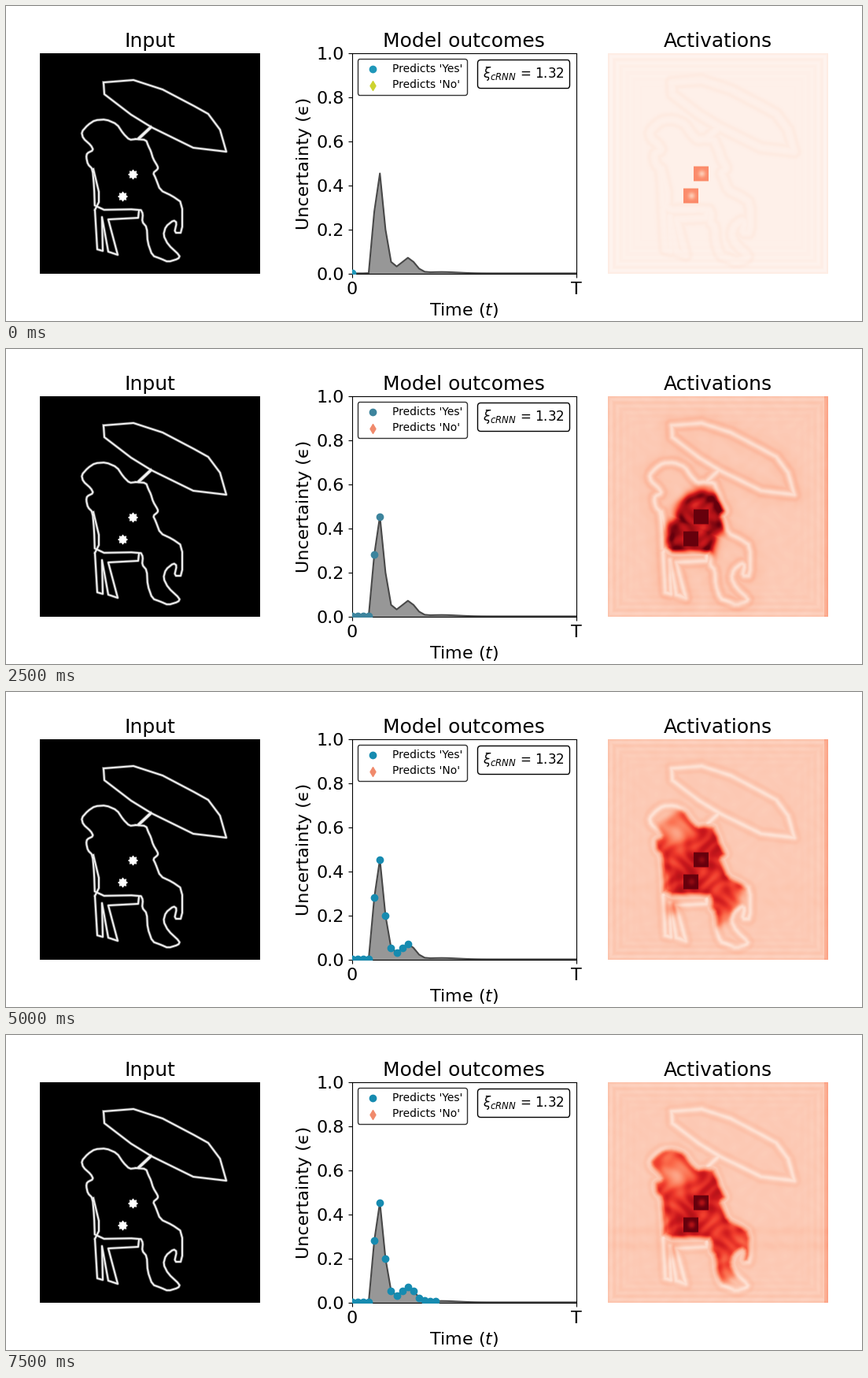
These frames come from a looping animation (1088 by 400 pixels, 8 s). A matplotlib script:

```python
import numpy as np
import matplotlib.pyplot as plt
from matplotlib.animation import FuncAnimation
from matplotlib.offsetbox import AnchoredText
from matplotlib.path import Path

plt.rcParams["font.family"] = "DejaVu Sans"
W, H, DPI, STEPS = 1088, 400, 100, 16
fig = plt.figure(figsize=(W / DPI, H / DPI), dpi=DPI, facecolor="white")


def panel(x, y, w, h, title):
    ax = fig.add_axes([x / W, 1 - (y + h) / H, w / W, h / H])
    ax.set_title(title, fontsize=18)
    return ax


def soften(line):
    """Cut every corner of an open line once."""
    a, b = line[:-1], line[1:]
    cut = np.stack([0.8 * a + 0.2 * b, 0.2 * a + 0.8 * b], axis=1)
    return np.vstack([line[:1], cut.reshape(-1, 2), line[-1:]])


# ---- line drawing, in stage pixels of the left panel
canopy = np.array([(124, 97), (162, 94), (199, 106), (239, 127), (257, 137),
                   (272, 157), (280, 185), (238, 180), (185, 154),
                   (159, 138), (125, 112), (124, 97)])
body = soften(np.array([
    (165, 169), (157, 170), (149, 162), (141, 150), (127, 144), (113, 145),
    (104, 151), (96, 160), (98, 168), (108, 177), (111, 183), (103, 187),
    (102, 192), (104, 201), (110, 207), (112, 230), (113, 259), (171, 258),
    (174, 264), (173, 274), (179, 281), (180, 300), (186, 317), (197, 321),
    (206, 325), (219, 321), (221, 317), (206, 303), (200, 291), (203, 280),
    (213, 272), (217, 275), (214, 288), (224, 288), (224, 250), (211, 241),
    (196, 234), (190, 218), (187, 212), (193, 207), (193, 204), (187, 194),
    (184, 184), (181, 178), (178, 170), (165, 169)]))
chair = np.array([(113, 259), (116, 309), (123, 311), (122, 268), (130, 312),
                  (142, 316), (130, 271), (168, 269), (169, 260)])
arm = np.array([(111, 207), (118, 236), (118, 249), (113, 259)])
handle = np.array([(184, 154), (169, 168)])
strokes = [canopy, body, chair, arm, handle]
dots = np.array([(161.5, 214), (148.5, 242)])

ax_in = panel(43, 60, 280, 280, "Input")
ax_in.set(xlim=(43, 323), ylim=(340, 60), xticks=[], yticks=[])
ax_in.set_facecolor("black")
ax_in.spines[:].set_visible(False)
for color, width in (("#5a5a5a", 2.6), ("#f2f2f2", 1.4)):
    for line in strokes:
        ax_in.plot(*line.T, color=color, lw=width + (line is handle),
                   solid_joinstyle="round")
ang = np.arange(16) * np.pi / 8
rad = np.where(np.arange(16) % 2, 4.6, 6.6)
for x, y in dots:
    ax_in.fill(x + rad * np.cos(ang), y + rad * np.sin(ang), color="white", lw=0)

# ---- uncertainty curve: a sharp peak, a small echo and a flat tail
steps = np.arange(41)
curve = 0.002 + 0.07 * np.exp(-((steps - 10) / 1.75) ** 2)
curve += 0.006 * np.exp(-((steps - 16) / 4) ** 2)
curve[3:9] += [.001, .28, .453, .198, .048, .012]

ax = panel(439.6, 60, 285, 280, "Model outcomes")
ax.set(xlim=(0, steps[-1]), ylim=(0, 1))
ax.fill_between(steps, curve, color="#979797", lw=0)
ax.plot(steps, curve, color="#484848", lw=1.5)
ax.set_xticks([0, steps[-1]], ["0", "T"])
ax.set_yticks(np.arange(0, 1.1, 0.2))
ax.tick_params(labelsize=16)
ax.set_xlabel("Time ($t$)", fontsize=16)
ax.set_ylabel("Uncertainty (\u03f5)", fontsize=16)
yes = ax.scatter([], [], marker="o", lw=1, zorder=3, label="Predicts 'Yes'")
no = ax.scatter([], [], marker="d", lw=1, label="Predicts 'No'")
legend = ax.legend(loc="upper left", fontsize=10, edgecolor="black")
yes_key, no_key = legend.legend_handles
note = AnchoredText(r"$\xi_{cRNN}$ = 1.32", loc="upper right",
                    prop=dict(size=12), pad=0.4, borderpad=0.5)
note.patch.set_boxstyle("round,pad=0,rounding_size=0.2")
ax.add_artist(note)

# ---- activation map: heat floods the figure from the two dots
gx, gy = np.meshgrid(43.5 + np.arange(280), 60.5 + np.arange(280))


def seg_dist(a, b):
    d = b - a
    t = ((gx - a[0]) * d[0] + (gy - a[1]) * d[1]) / (d @ d)
    t = np.clip(t, 0, 1)
    return np.hypot(gx - a[0] - t * d[0], gy - a[1] - t * d[1])


def line_dist(line):
    line = line.astype(float)
    return np.min([seg_dist(a, b) for a, b in zip(line, line[1:])], axis=0)


def bump(d, w):
    return np.exp(-(d / w) ** 2)


def spot(x, y):
    return np.hypot(gx - x, gy - y)


outline = np.min([line_dist(s) for s in strokes], axis=0)
points = np.column_stack([gx.ravel(), gy.ravel()])
inside = Path(body).contains_points(points).reshape(gx.shape)
mask = np.clip(0.4 + np.where(inside, 1, -1) * line_dist(body) / 8, 0, 1)
reach = np.min([spot(x, y - 2) for x, y in dots], axis=0)
edge = np.minimum.reduce([gx - 43, 323 - gx, gy - 60, 340 - gy])
ripple = np.cos(edge * 0.75) * np.exp(-edge / 14)
grain = (np.sin(gx * .21 + 1.5 * np.sin(gy * .13)) *
         np.sin(gy * .19 + 1.3 * np.sin(gx * .11)))
face = bump(spot(129, 178), 17)
seat = bump(spot(125, 275), 9)
band = bump(gy - 249, 6) + bump(gy - 268, 6)


def activation(k):
    settle = 1 - np.exp(-k)
    pulse = (k / 2) ** 2 * np.exp(2 - k)
    img = 0.2 - 0.17 * np.exp(-k / 1.1) + 0.03 * ripple
    img += 0.1 * settle * (gx > 318) + 0.006 * settle * grain
    img += (0.03 + 0.05 * pulse) * bump(outline - 6.5, 3)
    img += 0.05 * pulse * bump(outline - 10, 10)
    img -= 0.08 * (1 - np.exp(-k / 2)) * bump(outline, 2.6)
    img += 0.02 * np.clip((k - 7) / 8, 0, 1) * band

    radius = min(6.6 * k, 85)
    flood = 1 / (1 + np.exp(np.clip((reach - radius) / 3, -40, 40)))
    heat = (0.55 + 0.2 * pulse - reach / 400) * (1 - 0.7 * face)
    heat = settle * flood * heat * (1 + 0.18 * grain)
    heat += 0.24 * bump(k - 5, 2.5) * bump(reach - radius + 7, 7)
    img += mask * heat + 0.25 * bump(k - 11, 4) * seat

    hole = 0.4 * (1 + np.cos(np.pi * (k - 2) / 3)) * np.exp(-k / 12)
    for x, y in dots:
        box = np.clip(10 - np.maximum(abs(gx - x), abs(gy - y + 1)), 0, 1)
        box *= 1 - 0.62 * np.exp(-k)
        img += box * (1 - img)
        img -= hole * bump(spot(x + 1, y - 1), 4.2)
    return np.clip(img, 0, 1)


maps = [activation(k) for k in range(STEPS)]
ax_act = panel(765, 60, 280, 280, "Activations")
image = ax_act.imshow(maps[0], cmap="Reds", vmin=0, vmax=1, aspect="auto",
                      interpolation="nearest")
ax_act.axis("off")

GREY, TEAL = np.array([(93, 127, 142), (22, 139, 176)]) / 255


def key_colors(k):
    if k == 0:
        return "#1f97b9", "#cdd32f"
    mix = min((k - 1) / 6, 1) ** 2
    return GREY + (TEAL - GREY) * mix, "#becb7c" if k < 5 else "#f08a6c"


def update(k):
    yes_color, no_color = key_colors(k)
    yes.set_offsets(np.column_stack([steps, curve])[:k + 1])
    yes.set_color(yes_color)
    yes_key.set_color(yes_color)
    no_key.set_color(no_color)
    image.set_data(maps[k])
    return yes, yes_key, no_key, image


anim = FuncAnimation(fig, update, frames=STEPS, interval=500, repeat=True,
                     repeat_delay=0, blit=False)
plt.show()
```
